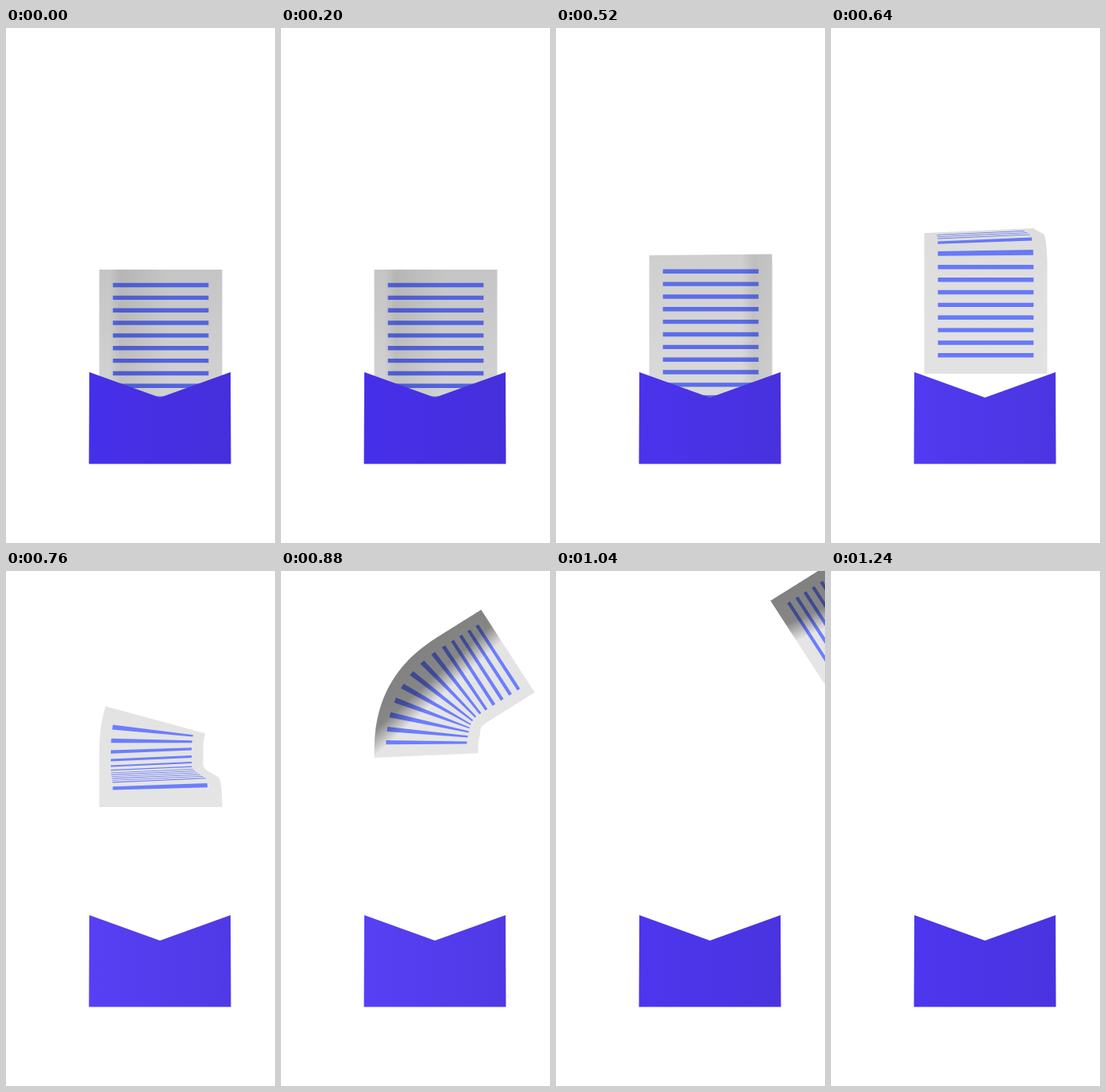
Write an HTML page with a canvas that moves like this. It is 339 px wide and 648 px high and loops after 2 s.

```html
<!DOCTYPE html>
<html lang="en">
<head>
<meta charset="utf-8">
<title>Letter leaving an envelope</title>
<style>
  html, body { margin: 0; width: 100%; height: 100%; overflow: hidden; background: #fff; }
  canvas { display: block; width: 339px; height: 648px; }
</style>
</head>
<body>
<canvas id="stage" width="339" height="648"></canvas>
<script>
const ctx = document.getElementById('stage').getContext('2d');
const W = 339, H = 648;
const LOOP = 2000, STEP = 40, LAUNCH = 440, GONE = 1240;
const SHEET = 233, LINES = 13, FIRST = 19.5, GAP = 15.85, HALF = 2.7;
const DEG = Math.PI / 180;

const mix = (a, b, u) => a + (b - a) * u;

function smooth(from, to, x) {
  const u = Math.min(1, Math.max(0, (x - from) / (to - from)));
  return u * u * (3 - 2 * u);
}

// The sheet runs along a fixed track: up, back over a fold, up again, then off to the right.
// q is the distance along the track.
const speed = q => 1 + 0.13 * smooth(232, 246, q) - 0.98 * smooth(253, 283, q) + 0.62 * smooth(350, 442, q);
const heading = q => 58 * DEG * smooth(412, 568, q);
const tilt = q => (59.5 * smooth(415, 575, q) - 2.5 * smooth(240, 275, q)) * DEG;
const breadth = q => 155 - 24 * smooth(240, 385, q) - 7 * smooth(450, 540, q);

const LEFT = 65.5;
const spine = [[183, 537]];
for (let q = 0; q < 1300; q++) {
  const [x, y] = spine[q], v = speed(q + 0.5), a = heading(q + 0.5);
  spine.push([x + v * Math.sin(a), y - v * Math.cos(a)]);
}

function point(q, across) {
  const i = Math.floor(q), a = spine[i], b = spine[i + 1];
  const offset = across * breadth(q) - LEFT, angle = tilt(q);
  return [
    mix(a[0], b[0], q - i) + offset * Math.cos(angle),
    mix(a[1], b[1], q - i) + offset * Math.sin(angle)
  ];
}

// Accelerates from rest towards a steady speed
function travel(t) {
  const ease = 367;
  return 2 * (Math.hypot(Math.max(0, t - LAUNCH), ease) - ease);
}

function trace(points) {
  ctx.beginPath();
  points.forEach(p => ctx.lineTo(p[0], p[1]));
  ctx.closePath();
}

function strip(from, to, left, right, count) {
  const a = [], b = [];
  for (let i = 0; i <= count; i++) {
    const q = mix(from, to, i / count);
    a.push(point(q, left));
    b.unshift(point(q, right));
  }
  trace(a.concat(b));
}

const grey = v => `rgb(${v},${v},${v})`;

function gradient(x0, y0, x1, y1, ...stops) {
  const g = ctx.createLinearGradient(x0, y0, x1, y1);
  stops.forEach(([at, color]) => g.addColorStop(at, color));
  return g;
}

function flood(fill) {
  ctx.fillStyle = fill;
  ctx.fillRect(0, 0, W, H);
}

function drawSheet(t) {
  const low = travel(t), high = low + SHEET;
  const light = smooth(380, 740, t);
  ctx.save();
  strip(low, high, 0, 1, 80);
  ctx.clip();
  const top = point(high, 0)[1];
  flood(gradient(0, top, 0, top + 160, [0, grey(mix(197, 227, light))], [1, grey(mix(211, 229, light))]));

  ctx.fillStyle = `rgb(${mix(84, 108, light)},${mix(100, 126, light)},${mix(222, 253, light)})`;
  for (let i = 0; i < LINES; i++) {
    const q = high - FIRST - i * GAP;
    strip(q - HALF, q + HALF, 0.111, 0.889, 2);
    ctx.fill();
  }

  ctx.globalCompositeOperation = 'multiply';
  passingShade(t);
  bendShadow(t);
  ctx.restore();
}

// Soft vertical shade that crosses the sheet before it leaves
function passingShade(t) {
  const x = 145 + 0.65 * Math.max(0, t - 360);
  flood(gradient(x - 15, 0, x + 60, 0, [0, '#fff'], [0.2, grey(234)], [1, '#fff']));
}

// Dark upper side of the turn to the right
function bendShadow(t) {
  const power = smooth(780, 880, t), turn = smooth(880, 1040, t);
  const x = mix(205, 315, turn), y = mix(144, 74, turn);
  const angle = mix(228, 246, turn) * DEG;
  const nx = Math.cos(angle), ny = Math.sin(angle);
  flood(gradient(x - 8 * nx, y - 8 * ny, x + 62 * nx, y + 62 * ny,
    [0, '#fff'], [0.35, grey(255 - 105 * power)], [1, grey(255 - 112 * power)]));
}

function drawEnvelope(t) {
  const glow = smooth(400, 800, t) - 0.6 * smooth(880, 1040, t);
  const color = (lift, blue) => `rgb(${70 + lift * glow},${47 + lift * glow},${blue + 10 * glow})`;
  trace([[105, 433], [194, 465], [283, 433], [283.5, 548.5], [104.5, 548.5]]);
  ctx.fillStyle = gradient(105, 0, 283, 0, [0, color(17, 234)], [1, color(10, 219)]);
  ctx.fill();
}

const start = performance.now();
function frame() {
  const t = Math.floor((performance.now() - start) % LOOP / STEP) * STEP;
  flood('#fff');
  if (t < GONE) drawSheet(t);
  drawEnvelope(t);
  requestAnimationFrame(frame);
}
frame();
</script>
</body>
</html>
```
